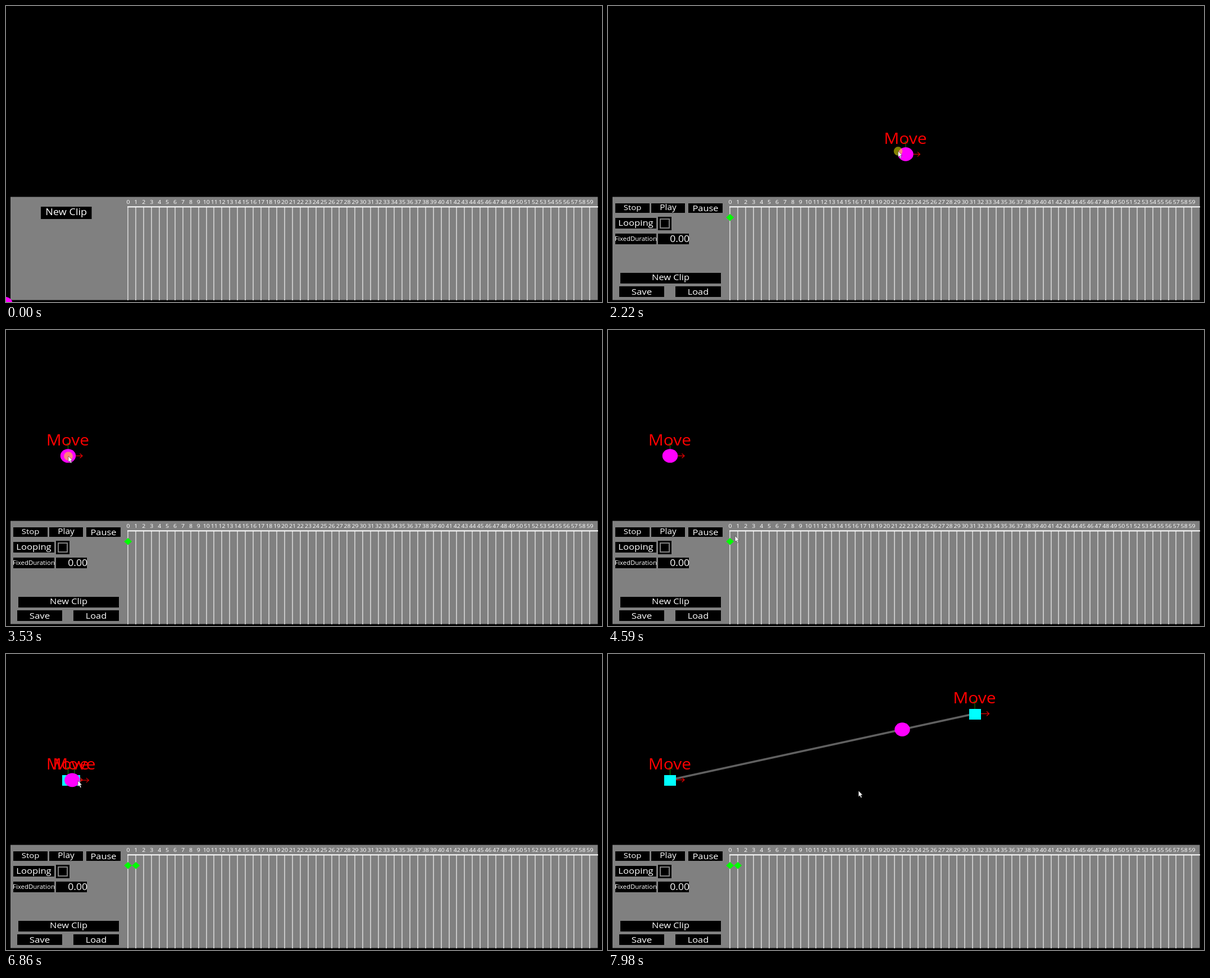
Recreate the animation shown at these times as an HTML page with a canvas. Size 1061x528 px, loop 8000 ms.

```html
<!DOCTYPE html>
<html lang="en">
<head>
<meta charset="utf-8">
<title>Clip editor</title>
<style>
  html, body { margin: 0; width: 100%; height: 100%; overflow: hidden; background: #000; }
  canvas { display: block; }
</style>
</head>
<body>
<canvas id="stage" width="1061" height="528"></canvas>
<script>
const LOOP = 8000;
const ASPECT = 1.13; // the scene is wider than it is tall by this factor
const MENU = ['Move', 'Scale', 'Rotate', 'Add', 'Delete', 'Reset'];

// moments of the session, in ms
const ENTER = 130, CREATE = 1135, MENU_OPEN = 5270, ADD = 6110, MENU_CLOSE = 6180;
const DRAG_1 = [2220, 3530], DRAG_2 = [6770, 7850];

// where the hand stops or turns: time, x, y
const STOPS = [
  [ENTER, 883, 496], [260, 626, 414], [400, 626, 414],
  [870, 108, 366], [1340, 108, 366],
  [1950, 554, 264], [DRAG_1[0], 517, 259], [2770, 222, 208.5],
  [DRAG_1[1], 111, 225], [3670, 111, 225],
  [4490, 242, 388], [5280, 118, 225],
  [5420, 141, 262], [5800, 143, 332], [6190, 143, 311],
  [6860, 128, 226], [6990, 131, 225], [DRAG_2[1], 653, 107], [7980, 446, 244],
];

const ctx = document.getElementById('stage').getContext('2d');
const clamp = (v, low = 0, high = 1) => Math.min(high, Math.max(low, v));
const progress = (t, [from, to]) => clamp((t - from) / (to - from));
const mix = (a, b, k) => a.map((v, i) => v + (b[i] - v) * k);

function hand(t) {
  const next = Math.max(1, STOPS.findIndex(stop => stop[0] >= t));
  const [t0, ...from] = STOPS.at(t > STOPS.at(-1)[0] ? -2 : next - 1);
  const [t1, ...to] = t > STOPS.at(-1)[0] ? STOPS.at(-1) : STOPS[next];
  return mix(from, to, progress(t, [t0, t1]));
}

// the grabbed ball closes in on the pointer while it is dragged
function firstHandle(t) {
  const [x, y] = hand(clamp(t, ...DRAG_1));
  const gap = 1 - progress(t, DRAG_1);
  return [x - 0.5 + 14 * gap ** 1.5, y - 0.5 + 6 * gap ** 4];
}

function secondHandle(t) {
  const [x, y] = hand(clamp(t, ...DRAG_2));
  return mix(firstHandle(t), [x, y - 0.5], clamp((t - DRAG_2[0]) / 140));
}

function box(x, y, w, h, color) {
  ctx.fillStyle = color;
  ctx.fillRect(x, y, w, h);
}

// cy is the middle of the capitals
function label(text, cx, cy, size, color = '#fff') {
  ctx.save();
  ctx.translate(cx, cy + size * 0.357);
  ctx.scale(ASPECT, 1);
  ctx.font = `${size}px "Open Sans", "Noto Sans", sans-serif`;
  ctx.textAlign = 'center';
  ctx.fillStyle = color;
  ctx.fillText(text, 0, 0);
  ctx.restore();
}

function button(text, x, y, w, h, size, { hover = false, lift = 0 } = {}) {
  box(x, y, w, h, hover ? '#383838' : '#000');
  label(text, x + w / 2, y + h / 2 - lift, size);
}

function polygon(color, points) {
  ctx.fillStyle = color;
  ctx.beginPath();
  points.forEach(point => ctx.lineTo(...point));
  ctx.fill();
}

function line(color, width, ...points) {
  ctx.strokeStyle = color;
  ctx.lineWidth = width;
  ctx.beginPath();
  points.forEach(point => ctx.lineTo(...point));
  ctx.stroke();
}

function oval(x, y, rx, ry, color) {
  ctx.fillStyle = color;
  ctx.beginPath();
  ctx.ellipse(x, y, rx, ry, 0, 0, 7);
  ctx.fill();
}

const ball = (x, y) => oval(x, y, 13.7, 12.3, '#f0f');
const square = (x, y) => box(Math.round(x - 10.5), Math.round(y - 9), 21, 19, '#0ff');
const diamond = x =>
  polygon('#0f0', [[x - 7, 377.3], [x, 371], [x + 7, 377.3], [x, 383.6]]);

function handle(x, y) {
  const green = '#008c00', red = '#e60000';
  line(green, 1, [x, y], [x, y - 23]);
  line(green, 1, [x - 4, y - 19], [x, y - 23], [x + 4, y - 19]);
  line(red, 1.2, [x, y], [x + 25.5, y]);
  line(red, 1.2, [x + 21, y - 4], [x + 25.5, y], [x + 21, y + 4]);
  label('Move', x - 0.5, y - 28.3, 26.5, '#f00');
}

function timeline() {
  box(8, 340.5, 1045.5, 184, '#808080');
  for (let i = 0; i < 60; i++) {
    const x = 217.2 + i * 13.935;
    box(Math.round(x) - 1, 359, 2, 166, '#c6c6c6');
    label(i, x + 0.2, 349.4, 9.3);
  }
  box(216, 357.3, 838, 2, '#fff');
}

function controls(hoverPlay) {
  button('Stop', 13, 352, 61, 17, 13.2, { lift: 1.5 });
  button('Play', 77, 352, 60, 17, 13.6, { lift: 1.5, hover: hoverPlay });
  button('Pause', 143, 352, 61, 17, 14.5);
  button('Looping', 13, 378, 73, 19, 14.7, { lift: 0.8 });
  box(89, 376, 24, 24, '#000');
  ctx.strokeStyle = '#808080';
  ctx.lineWidth = 2;
  ctx.strokeRect(93, 380, 16, 16);
  button('FixedDuration', 13, 406, 73, 19, 10.1);
  box(89, 406, 55, 19, '#000');
  label('0.00', 127.7, 415.5, 15.6);
  button('New Clip', 22, 476, 179, 19, 14.5, { lift: 1.2 });
  button('Save', 20, 500, 80, 19, 15);
  button('Load', 120, 500, 81, 19, 14.5);
}

function menu(pointerY) {
  box(118, 224, 53, 149, '#fff');
  MENU.forEach((name, i) => {
    const cy = 238.7 + i * 23.9;
    const hover = Math.abs(pointerY - cy) < 9.5;
    box(123, cy - 9.2, 43, 18.4, hover ? '#b2b2b2' : '#808080');
    label(name, 144.3, cy, 11, '#000');
  });
}

function pointer(x, y, pressed) {
  if (pressed) oval(x, y, 7.8, 7.8, 'rgba(255,255,0,.5)');
  const shape = [[0, 0], [0, 10.5], [2.4, 8.4], [4.2, 12.5], [6, 11.7], [4.2, 7.7], [7.3, 7.5]]
    .map(([dx, dy]) => [x + dx, y + dy]);
  polygon('#fff', shape);
  line('rgba(0,0,0,.6)', 0.7, ...shape, shape[0]);
}

function isPressed(t) {
  const clicked = [CREATE, MENU_OPEN, ADD].some(click => Math.abs(t - click + 30) < 35);
  return clicked || t >= DRAG_1[0] && t < DRAG_1[1] + 70 || t > 6920 && t < DRAG_2[1] + 30;
}

function keyframes(t) {
  const first = firstHandle(t), second = secondHandle(t);
  diamond(217.2);
  if (t >= MENU_CLOSE) diamond(231.2);
  if (t < ADD) {
    handle(...first);
    ball(...first);
    return;
  }
  line('#606060', 3.7, first, second);
  [second, first].forEach(at => handle(...at));
  [first, second].forEach(at => square(...at));
  ball(...mix(first, second, (t - 219) % 1000 / 1000)); // one pass per second
}

function draw(t) {
  const [x, y] = hand(t);
  box(0, 0, 1061, 528, '#000');
  timeline();
  if (t < CREATE) {
    button('New Clip', 62, 358, 90.5, 22, 16, { hover: t > 800, lift: 1.5 });
    ball(-2, 531);
  } else {
    controls(t < 1400);
    keyframes(t);
  }
  if (t >= MENU_OPEN && t < MENU_CLOSE) menu(y);
  if (t >= ENTER) pointer(x, y, isPressed(t));
}

function tick() {
  draw(performance.now() % LOOP);
  requestAnimationFrame(tick);
}
tick();
</script>
</body>
</html>
```
